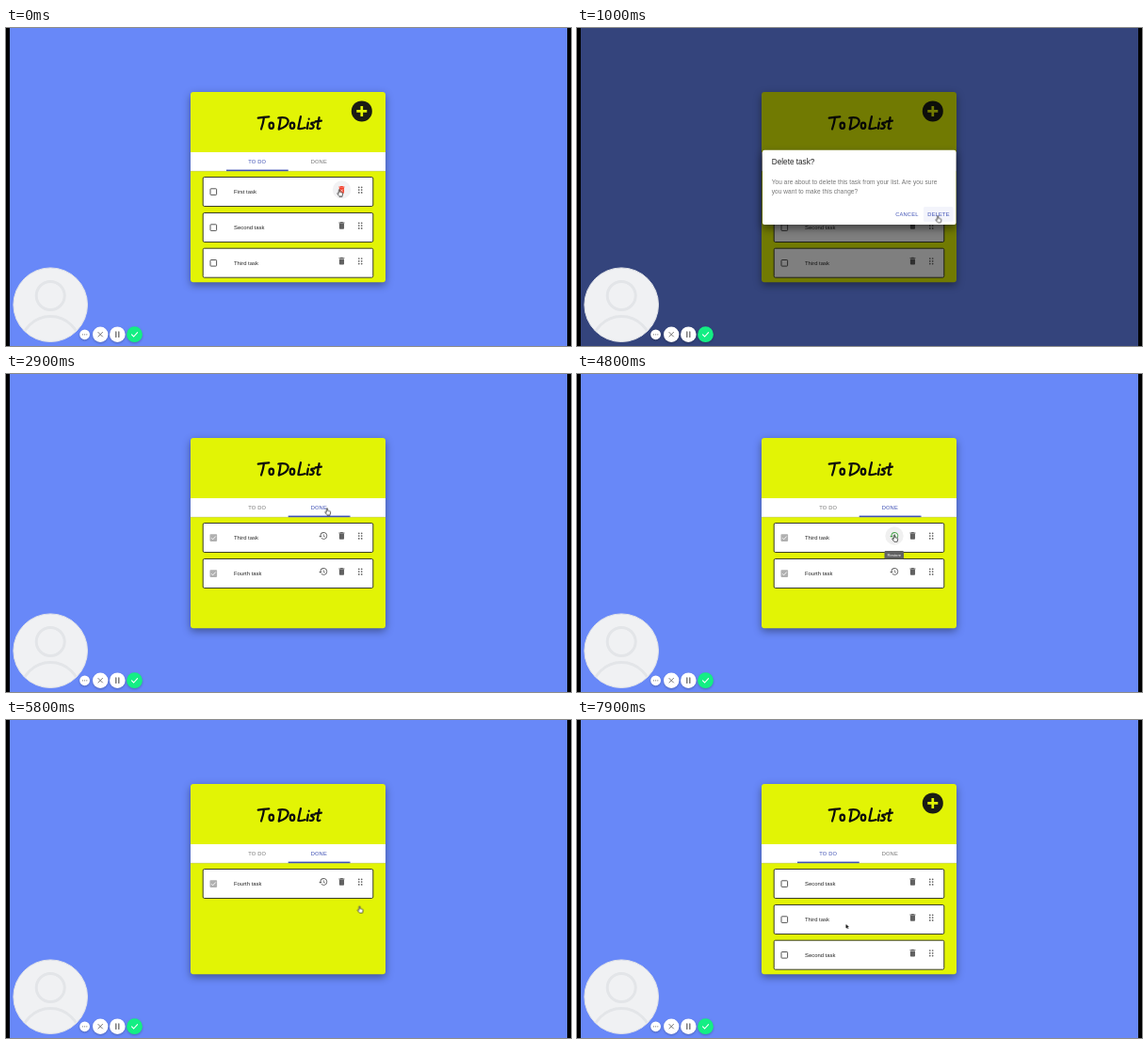
Animation of 600 by 338 pixels, one loop 8000 ms. Source, as an HTML page:

```html
<!DOCTYPE html>
<html lang="en">
<head>
<meta charset="utf-8">
<title>To Do List</title>
<style>
html, body { margin: 0; width: 100%; height: 100%; overflow: hidden; background: #000; }
svg { display: block; width: 600px; height: 338px; font-family: "Liberation Sans", Arial, sans-serif; }
.card { fill: #e2f405; filter: drop-shadow(0 3px 4px rgba(0,0,0,.4)); }
.title { fill: none; stroke: #0c0c0c; stroke-width: 2.2; stroke-linecap: round; stroke-linejoin: round; }
.row { fill: #fff; stroke: #3a3d2a; }
.task { font-size: 5.9px; fill: #222; }
.icon { fill: #616161; }
.tab { font-size: 5.75px; letter-spacing: .0286em; text-anchor: middle; }
.dialog { fill: #fff; filter: drop-shadow(0 4px 5px rgba(0,0,0,.5)); }
.head { font-size: 8.2px; fill: #222; }
.body { font-size: 6.5px; letter-spacing: .0094em; fill: #757575; }
.btn { font-size: 5.75px; letter-spacing: .0286em; text-anchor: end; fill: #3f51b5; }
.tool { filter: drop-shadow(0 1px 1px rgba(0,0,0,.25)); }

/* hard switches */
.first, .left, .second, .todo, .done, .both, .one, .trash, .restore, .tip, .hand, .arrow, .press
  { animation: 8s step-end infinite; }
.first { animation-name: first; }
.second { animation-name: second; }
.left { animation-name: left; }
.todo { animation-name: todo; }
.done { animation-name: done; }
.both { animation-name: both; }
.one { animation-name: one; }
.trash { animation-name: trash; }
.restore { animation-name: restore; }
.tip { animation-name: tip; }
.hand { animation-name: hand; }
.arrow { animation-name: arrow; }
.press { animation-name: press; }
@keyframes first { 0% { opacity: 1 } 16.5%, 100% { opacity: 0 } }
@keyframes second { 0% { opacity: 0 } 16.5% { opacity: 1 } 27% { opacity: 0 } 60%, 100% { opacity: 1 } }
@keyframes left { 0% { opacity: 0 } 27% { opacity: 1 } 60%, 100% { opacity: 0 } }
@keyframes todo { 0% { opacity: 1 } 33.75% { opacity: 0 } 81.5%, 100% { opacity: 1 } }
@keyframes done { 0% { opacity: 0 } 33.75% { opacity: 1 } 81.5%, 100% { opacity: 0 } }
@keyframes both { 0% { opacity: 1 } 69.5%, 100% { opacity: 0 } }
@keyframes one { 0% { opacity: 0 } 69.5%, 100% { opacity: 1 } }
@keyframes trash { 0% { opacity: 1 } 5.5%, 100% { opacity: 0 } }
@keyframes restore { 0% { opacity: 0 } 51% { opacity: 1 } 61.5%, 100% { opacity: 0 } }
@keyframes tip { 0% { opacity: 0 } 53% { opacity: 1 } 61.5%, 100% { opacity: 0 } }
@keyframes press { 0% { opacity: 0 } 10.6% { opacity: 1 } 17%, 100% { opacity: 0 } }
@keyframes hand {
  0% { opacity: 1 } 5% { opacity: 0 } 10.6% { opacity: 1 } 17.5% { opacity: 0 }
  24.4% { opacity: 1 } 27.5% { opacity: 0 } 32% { opacity: 1 } 40% { opacity: 0 }
  50% { opacity: 1 } 61.2% { opacity: 0 } 65.6% { opacity: 1 } 73.7% { opacity: 0 }
  80% { opacity: 1 } 97.2%, 100% { opacity: 0 }
}
@keyframes arrow {
  0% { opacity: 0 } 5% { opacity: 1 } 10.6% { opacity: 0 } 17.5% { opacity: 1 }
  24.4% { opacity: 0 } 27.5% { opacity: 1 } 32% { opacity: 0 } 40% { opacity: 1 }
  50% { opacity: 0 } 61.2% { opacity: 1 } 65.6% { opacity: 0 } 73.7% { opacity: 1 }
  80% { opacity: 0 } 97.2%, 100% { opacity: 1 }
}

/* smooth motion */
.ask-delete { animation: askDelete 8s linear infinite; }
.ask-restore { animation: askRestore 8s linear infinite; }
.bar { animation: bar 8s ease-in-out infinite; }
.cursor { animation: cursor 8s ease-in-out infinite; }
@keyframes askDelete { 0%, 3.75% { opacity: 0 } 5.7%, 15% { opacity: 1 } 17%, 100% { opacity: 0 } }
@keyframes askRestore { 0%, 60.25% { opacity: 0 } 62.2%, 68.1% { opacity: 1 } 70.1%, 100% { opacity: 0 } }
@keyframes bar {
  0%, 33.5% { transform: none } 35.8%, 81.4% { transform: translate(65.7px) } 83.7%, 100% { transform: none }
}
@keyframes cursor {
  0%, 4.5% { transform: translate(354px, 171.5px) }
  11.3%, 16% { transform: translate(383.2px, 199.5px) }
  25%, 27% { transform: translate(220px, 211px) }
  33%, 40% { transform: translate(341px, 142.5px) }
  50.5%, 60.5% { transform: translate(337px, 171px) }
  62.5% { transform: translate(343.5px, 177px) }
  66.3%, 68.5% { transform: translate(381px, 197px) }
  72.5%, 74% { transform: translate(375.5px, 197.7px) }
  80.5%, 96.5% { transform: translate(270.5px, 142.5px) }
  98.7%, 100% { transform: translate(285.5px, 217px) }
}
</style>
</head>
<body>
<svg viewBox="0 0 600 338">
  <defs>
    <path id="bin" d="M6 19c0 1.1.9 2 2 2h8c1.1 0 2-.9 2-2V7H6zM19 4h-3.5l-1-1h-5l-1 1H5v2h14z" transform="translate(351.3 166.8) scale(.43)"/>
    <path id="clock" d="M13 3a9 9 0 0 0-9 9H1l3.9 3.9L9 12H6a7 7 0 1 1 2.06 4.94l-1.42 1.42A9 9 0 1 0 13 3zm-1 5v5l4.28 2.54.72-1.21-3.5-2.08V8z" transform="translate(331.8 166.8) scale(.43)"/>
    <g id="grip">
      <path d="M374.8 169.3v0m0 2.8v0m0 2.8v0m2.9-5.6v0m0 2.8v0m0 2.8v0" stroke="#616161" stroke-width="1.7" stroke-linecap="round"/>
    </g>
    <g id="base">
      <rect class="row" x="209.2" y="158.5" width="180.6" height="31" rx="1.5"/>
      <use href="#bin" class="icon"/>
      <use href="#grip"/>
    </g>
    <g id="open">
      <use href="#base"/>
      <rect x="217" y="170.8" width="6.6" height="6.6" rx=".7" fill="none" stroke="#555"/>
    </g>
    <g id="closed">
      <use href="#base"/>
      <use href="#clock" class="icon"/>
      <rect x="216.5" y="170.3" width="7.6" height="7.6" rx=".8" fill="#b0b0b0"/>
      <path d="M218 174.2l1.6 1.6 3.1-3.3" fill="none" stroke="#fff" stroke-width=".9"/>
    </g>
    <g id="second"><use href="#open"/><text class="task" x="242" y="176">Second task</text></g>
    <g id="third"><use href="#open"/><text class="task" x="242" y="176">Third task</text></g>
    <g id="fourth"><use href="#closed"/><text class="task" x="242" y="176">Fourth task</text></g>
    <clipPath id="face"><circle cx="47.2" cy="294.2" r="39"/></clipPath>
  </defs>

  <rect x="4" width="592" height="338" fill="#6888f8"/>
  <rect class="card" x="196" y="68" width="207" height="202.3" rx="3"/>

  <g class="title" role="img" aria-label="To Do List">
    <path d="M267.7 95.6q5.5-.8 11.6-1.3M274 95.2q-.8 6-3 12.3"/>
    <ellipse cx="281.8" cy="103.8" rx="2.3" ry="3.1"/>
    <path d="M291.7 95.3q-.6 6-2 12M289.3 95.5q9.8-1.6 10.4 3.5q-.2 5.800-10 8.600"/>
    <ellipse cx="304" cy="103.8" rx="2.3" ry="3.1"/>
    <path d="M313 94q-1.500 6.600-2.700 13q4 .4 7.300-.9M320.800 100.700l-1 6.300M321.700 96.700v.1"/>
    <path d="M327.500 100.600q-4-.5-3.300 1.600q3 1 2.400 3.200q-1 2.200-4 1.300M332.600 95q-1 6-2 11q.8 1.800 2.800.6M328.700 99.400l6.300-.7"/>
  </g>

  <rect x="196" y="132" width="207" height="20" fill="#fff"/>
  <path d="M196 152.200h207" stroke="#b8bd8a" stroke-width=".5"/>
  <rect class="bar" x="234" y="150.600" width="65.700" height="1.500" fill="#3f51b5"/>

  <g class="todo">
    <text class="tab" x="266.700" y="144" fill="#3f51b5">TO DO</text>
    <text class="tab" x="332.300" y="144" fill="#757575">DONE</text>
    <circle cx="377.800" cy="88.400" r="11" fill="#1b1c14"/>
    <path d="M372.300 88.400h11m-5.500-5.500v11" stroke="#e2f405" stroke-width="2.700"/>
    <g class="first">
      <use href="#open"/><text class="task" x="242" y="176">First task</text>
      <use href="#second" y="38"/>
      <use href="#third" y="75.700"/>
      <g class="trash">
        <circle cx="356.500" cy="172" r="9.700" fill="#f2f2f4"/>
        <use href="#bin" fill="#f4402c"/>
        <path d="M355 171.300l3 3m0-3l-3 3" stroke="#fff" stroke-width=".6"/>
      </g>
    </g>
    <g class="second">
      <use href="#second"/>
      <use href="#third" y="38"/>
      <use href="#second" y="75.700"/>
    </g>
    <g class="left">
      <use href="#second"/>
      <use href="#second" y="38"/>
    </g>
  </g>

  <g class="done">
    <text class="tab" x="266.700" y="144" fill="#757575">TO DO</text>
    <text class="tab" x="332.300" y="144" fill="#3f51b5">DONE</text>
    <g class="both">
      <use href="#closed"/><text class="task" x="242" y="176">Third task</text>
      <use href="#fourth" y="38"/>
      <g class="restore">
        <circle cx="337" cy="172" r="9.700" fill="#f0f0f0"/>
        <use href="#clock" fill="#43a047"/>
      </g>
      <g class="tip">
        <rect x="326.500" y="188" width="20.500" height="8.500" rx="1.200" fill="#616161"/>
        <text x="336.800" y="193.700" font-size="4.200" fill="#fff" text-anchor="middle">Restore</text>
      </g>
    </g>
    <g class="one"><use href="#fourth"/></g>
  </g>

  <g class="ask-delete">
    <rect x="4" width="592" height="338" opacity=".5"/>
    <rect class="dialog" x="197" y="129.700" width="205.500" height="79.300" rx="2"/>
    <text class="head" x="206.800" y="145.300">Delete task?</text>
    <text class="body" x="206.800" y="166.200">You are about to delete this task from your list. Are you sure</text>
    <text class="body" x="206.800" y="176.200">you want to make this change?</text>
    <rect class="press" x="368" y="190" width="31.500" height="16" rx="1.500" fill="#f3f4fb"/>
    <text class="btn" x="362.500" y="200.200">CANCEL</text>
    <text class="btn" x="395.700" y="200.200">DELETE</text>
  </g>

  <g class="ask-restore">
    <rect x="4" width="592" height="338" opacity=".5"/>
    <rect class="dialog" x="197" y="129.700" width="205.500" height="79.300" rx="2"/>
    <text class="head" x="206.800" y="145.300">Restore task?</text>
    <text class="body" x="206.800" y="166.200">You are about to restore this task from Done tasks. Are you</text>
    <text class="body" x="206.800" y="176.200">sure you want to make this change?</text>
    <text class="btn" x="357.200" y="200.200">CANCEL</text>
    <text class="btn" x="395.700" y="200.200">RESTORE</text>
  </g>

  <circle cx="47.200" cy="294.200" r="39.300" fill="#f0f1f3" stroke="#e0e2e6" stroke-width="1"/>
  <g clip-path="url(#face)" fill="none" stroke="#e3e5e8" stroke-width="3">
    <circle cx="47.200" cy="284.500" r="15"/>
    <circle cx="47.200" cy="338" r="31.500"/>
  </g>
  <g class="tool" fill="#fff">
    <circle cx="83.600" cy="325.800" r="5.400"/>
    <circle cx="100.200" cy="325.700" r="8.200"/>
    <circle cx="118.300" cy="325.700" r="8.300"/>
    <circle cx="136.500" cy="325.700" r="8.400" fill="#14ee84"/>
  </g>
  <g fill="none" stroke="#777" stroke-linecap="round">
    <path d="M81.400 325.800v0m2.200 0v0m2.200 0v0" stroke-width="1.200"/>
    <path d="M97.900 323.400l4.600 4.600m0-4.600l-4.600 4.600"/>
    <path d="M116.800 323v5.400m3-5.400v5.400" stroke="#666" stroke-width="1.300"/>
    <path d="M133.500 325.900l2.100 2.100 4-4.300" stroke="#fff" stroke-width="1.100"/>
  </g>

  <g class="cursor">
    <path class="hand" d="M-.7 .5q.7-1 1.300 0v2.300l2.300.5q1 .3.800 1.500l-.6 2.500h-3.200l-2.200-2.800q.2-1 1.100-.4l.5.4z" fill="#fff" stroke="#222" stroke-width=".7" stroke-linejoin="round"/>
    <path class="arrow" d="M0 0v4.600l1.100-1 .8 1.600.8-.4-.8-1.600 1.400-.1z" fill="#111" stroke="#fff" stroke-width=".5" paint-order="stroke"/>
  </g>
</svg>
</body>
</html>
```
